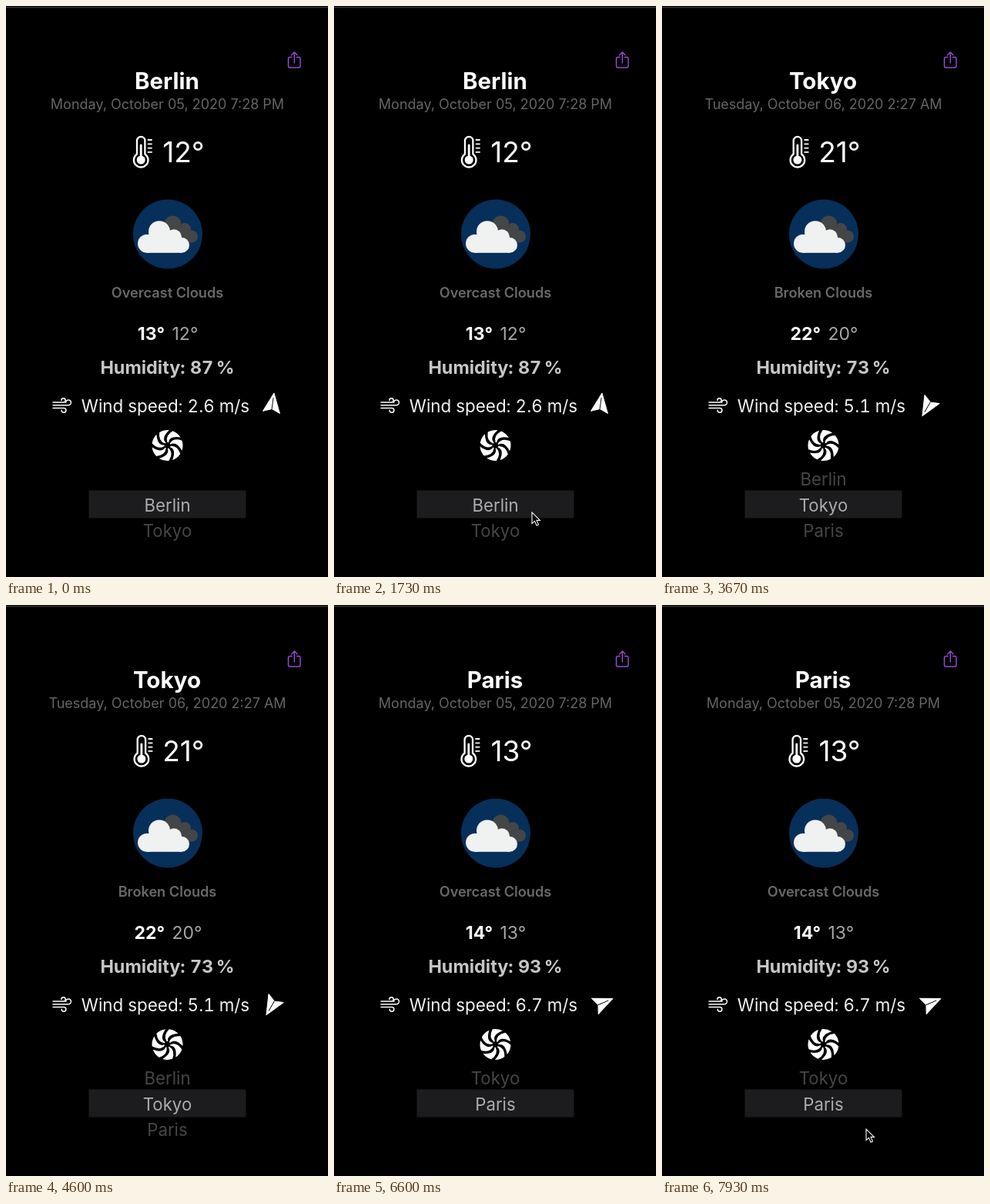
Write an HTML page that moves like this. It is 418 px wide and 742 px high and loops after 8000 ms.

```html
<!DOCTYPE html>
<html lang="en">
<head>
<meta charset="utf-8">
<title>Weather</title>
<style>
  html, body { margin: 0; width: 100%; height: 100%; overflow: hidden; background: #000; }
  svg { display: block; width: 100%; height: 100%; }
  text { font-family: Inter, Roboto, sans-serif; text-anchor: middle; }
  #wind, #humid { font-variant-numeric: tabular-nums; }
  .line { fill: none; stroke: #fff; stroke-linecap: round; stroke-linejoin: round; }
</style>
</head>
<body>
<svg viewBox="0 0 418 742">
  <defs>
    <clipPath id="inside"><rect x="107.500" y="629.500" width="204" height="36"/></clipPath>
    <clipPath id="outside"><path d="M107 560H312V629.500H107ZM107 665.500H312V742H107Z"/></clipPath>
  </defs>
  <rect width="418" height="742"/>
  <rect y="1" width="418" height="1.5" fill="#343434"/>

  <g class="line" style="stroke:#9a4bd6" stroke-width="1.4">
    <path d="M371 66.500h-2.500q-2 0-2 2v9.500q0 2 2 2h11.500q2 0 2-2v-9.500q0-2-2-2h-2.500M374.300 74V60.300M370.700 63.700l3.600-3.600 3.600 3.600"/>
  </g>

  <text id="city" x="209" y="108" font-size="29.500" font-weight="700" fill="#fff"></text>
  <text id="date" x="209.500" y="134" font-size="18" fill="#656567"></text>

  <g id="thermo" class="line" stroke-width="2.300">
    <path d="M170 192.500V175a5.200 5.200 0 0 1 10.400 0v17.500a9.300 9.300 0 1 1-10.400 0Z"/>
    <path d="M175.200 181V198" stroke-width="2.800"/>
    <path d="M184.500 174h4.500M184.500 179.300h4.500M184.500 184.600h4.500M184.500 189.900h4.500" stroke-width="1.800"/>
    <circle cx="175.200" cy="200" r="5.500" fill="#fff" stroke="none"/>
  </g>
  <text id="temp" x="230.500" y="203" font-size="37" fill="#fff"></text>

  <circle cx="210" cy="296.500" r="45" fill="#062f5a"/>
  <g fill="#444546">
    <circle cx="216.500" cy="283.500" r="11"/><circle cx="232" cy="290" r="8"/>
    <circle cx="241" cy="299.500" r="8"/><path d="M208 288h26l7 19.500h-26z"/>
  </g>
  <g fill="#f0f1f1" transform="translate(0 -.3)">
    <circle cx="199" cy="293.500" r="14"/><circle cx="183" cy="309" r="12"/>
    <circle cx="218" cy="300.500" r="10"/><circle cx="228" cy="311" r="10"/>
    <path d="M183 321V300l16-8 19 5 10 10v14z"/>
  </g>
  <text id="sky" x="209.500" y="379" font-size="18.150" font-weight="600" fill="#69696b"></text>

  <text id="high" x="206" y="434" font-size="23" font-weight="700" fill="#fff" style="text-anchor:end"></text>
  <text id="low" x="215.500" y="434" font-size="23" fill="#a5a5a7" style="text-anchor:start"></text>
  <text id="humid" x="209.500" y="478" font-size="23.400" font-weight="700" fill="#c6c6c8"></text>

  <g class="line" stroke-width="1.500">
    <path d="M61 515H74.500a2.600 2.600 0 1 0-2.600-2.600"/>
    <path d="M61 518.700H81a3.400 3.400 0 1 0-3.400-3.400"/>
    <path d="M61 522.400H75a2.900 2.900 0 1 1-2.900 2.900"/>
  </g>
  <text id="wind" x="207" y="528" font-size="22.400" fill="#f2f2f2"></text>
  <g id="arrow">
    <path d="M0-14L11 11 0 6.500-11 11Z" fill="#fff" stroke="#fff" stroke-linejoin="round"/>
    <path d="M0 7V-8" stroke="#000" stroke-width=".9"/>
  </g>

  <g id="fan" fill="#fff"></g>

  <rect x="107.500" y="629.500" width="204" height="36" fill="#1c1c1e"/>
  <g id="dim" clip-path="url(#outside)" fill="#464648" font-size="22.200"></g>
  <g id="lit" clip-path="url(#inside)" fill="#adadaf" font-size="22.200"></g>

  <path id="cursor" d="M0 0V14.500L3.500 11.300 6 17 8.500 15.900 6.100 10.400H10.500Z" fill="#000" stroke="#fff" stroke-width="1.100"/>
</svg>
<script>
const LOOP = 8000, ROW = 33.5;
const FAN_TURN = 3000, BLADES = 7;

const reports = [
  { from: 0, city: 'Berlin', date: 'Monday, October 05, 2020 7:28 PM', temp: '12°', sky: 'Overcast Clouds',
    high: '13°', low: '12°', humid: 87, wind: '2.6', arrow: [346, 517, 8], shift: 0 },
  { from: 2670, city: 'Tokyo', date: 'Tuesday, October 06, 2020 2:27 AM', temp: '21°', sky: 'Broken Clouds',
    high: '22°', low: '20°', humid: 73, wind: '5.1', arrow: [345, 520.5, 210], shift: 0.7 },
  { from: 5930, city: 'Paris', date: 'Monday, October 05, 2020 7:28 PM', temp: '13°', sky: 'Overcast Clouds',
    high: '14°', low: '13°', humid: 93, wind: '6.7', arrow: [349, 517, 67], shift: -0.4 }
];

// Each key: time, then values.
const wheelKeys = [[0, 0], [1900, 0], [2520, 1], [5280, 1], [5680, 2.09], [5740, 2.09], [5890, 2]];
const visits = [
  [[1530, 280, 742], [1730, 257, 658], [1900, 261, 674], [2400, 254, 646], [2650, 255, 656], [2800, 260.5, 685], [3000, 262, 742]],
  [[4850, 263, 711], [5200, 258, 671], [5300, 257, 676], [5600, 255, 651], [5730, 255, 655], [5900, 256, 674], [6060, 262, 742]],
  [[7800, 275, 742], [7930, 265, 681], [8000, 265, 681]]
];

const $ = id => document.getElementById(id);
const clamp = v => Math.max(0, Math.min(1, v));
const smooth = p => p * p * (3 - 2 * p);

function sample(keys, t) {
  const i = keys.findIndex(k => k[0] > t);
  if (i < 0) return keys[keys.length - 1].slice(1);
  if (i === 0) return keys[0].slice(1);
  const a = keys[i - 1], b = keys[i];
  const p = smooth((t - a[0]) / (b[0] - a[0]));
  return a.slice(1).map((v, n) => v + (b[n + 1] - v) * p);
}

function polar(r, deg) {
  const a = deg * Math.PI / 180;
  return `${(r * Math.sin(a)).toFixed(2)} ${(-r * Math.cos(a)).toFixed(2)}`;
}

function buildFan() {
  const blade = `M${polar(4, 0)}Q${polar(13, -14)} ${polar(20, 20)}` +
    `A20 20 0 0 1 ${polar(20, 58)}Q${polar(13, 10)} ${polar(4, 22)}Z`;
  $('fan').innerHTML = Array.from({ length: BLADES }, (_, i) =>
    `<path d="${blade}" transform="rotate(${i * 360 / BLADES})"/>`).join('');
}

function buildWheel() {
  const rows = reports.map(r => `<text x="209.5">${r.city}</text>`).join('');
  $('dim').innerHTML = $('lit').innerHTML = rows;
}

let shown = null;
function showReport(r) {
  if (r === shown) return;
  shown = r;
  for (const key of ['city', 'date', 'temp', 'sky', 'high', 'low']) $(key).textContent = r[key];
  $('humid').textContent = `Humidity: ${r.humid}\u2009%`;
  $('wind').textContent = `Wind speed: ${r.wind} m/s`;
  const [x, y, angle] = r.arrow;
  $('arrow').setAttribute('transform', `translate(${x} ${y}) rotate(${angle})`);
  $('thermo').setAttribute('transform', `translate(${r.shift} 0)`);
}

function render(t) {
  showReport(reports.filter(r => r.from <= t).pop());
  $('fan').setAttribute('transform', `translate(209.5 571) rotate(${t / FAN_TURN * 360})`);

  const [pos] = sample(wheelKeys, t);
  for (const id of ['dim', 'lit']) {
    [...$(id).children].forEach((row, i) => {
      const d = i - pos;
      row.setAttribute('y', 656.5 + d * ROW);
      row.setAttribute('opacity', clamp((1.55 - Math.abs(d)) / 0.4));
    });
  }

  const visit = visits.find(v => t >= v[0][0] && t < v[v.length - 1][0]);
  $('cursor').setAttribute('visibility', visit ? 'visible' : 'hidden');
  if (visit) $('cursor').setAttribute('transform', `translate(${sample(visit, t).join(' ')})`);
}

buildFan();
buildWheel();
const start = performance.now();
function tick() {
  render((performance.now() - start) % LOOP);
  requestAnimationFrame(tick);
}
tick();
</script>
</body>
</html>
```
